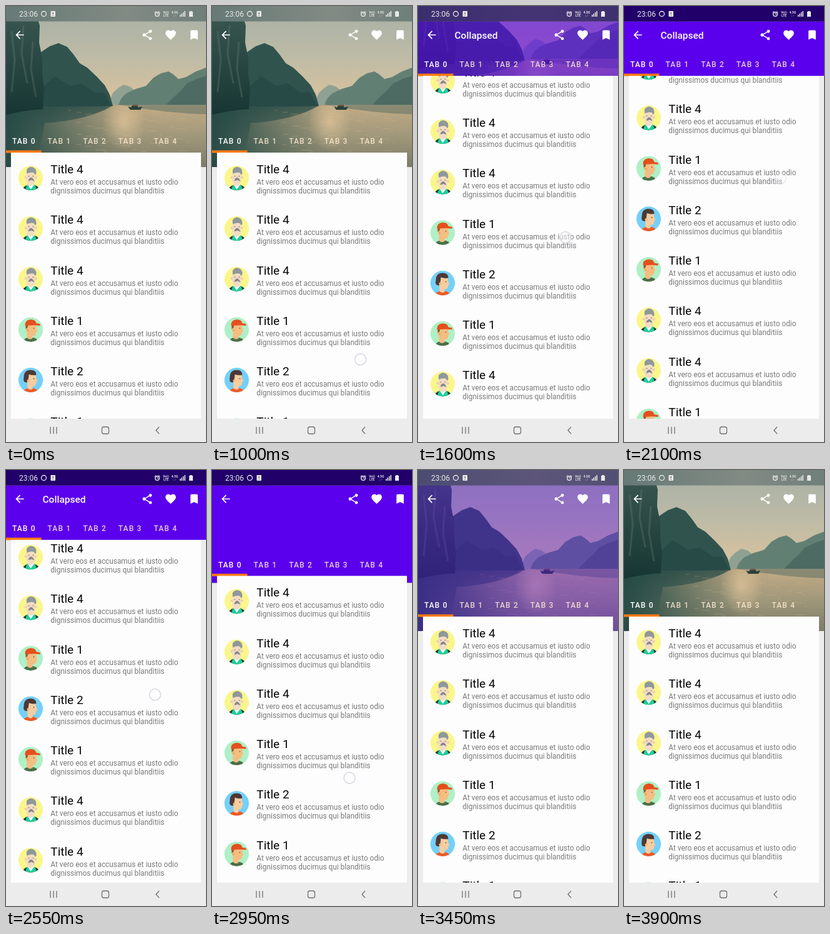
Recreate the animation shown at these times as an HTML page. Size 320 by 693 pixels, loop 3.95 s.

```html
<!DOCTYPE html>
<html lang="en">
<head>
<meta charset="utf-8">
<title>Collapsing header</title>
<style>
html, body { margin: 0; height: 100%; overflow: hidden; background: #ececec; }
svg { display: block; width: 100vw; height: 100vh; font-family: Roboto, sans-serif; }
.title { font-size: 19px; fill: #050505; }
.body { font-size: 11.85px; fill: #7a7a7a; }
.tab { font-size: 12px; font-weight: 500; letter-spacing: 1.15px; fill: #ffecd2; fill-opacity: .85; }
.tab:first-child { fill: #fff; fill-opacity: 1; }
.tiny { font-size: 5px; font-weight: 700; text-anchor: middle; }
</style>
</head>
<body>
<svg viewBox="0 0 320 693" xmlns="http://www.w3.org/2000/svg">
  <defs>
    <linearGradient id="sky" x2="0" y2="1">
      <stop stop-color="#a6b0a6"/><stop offset=".5" stop-color="#bdbba6"/><stop offset="1" stop-color="#dcc39c"/>
    </linearGradient>
    <linearGradient id="water" x2="0" y2="1">
      <stop stop-color="#c2aa84"/><stop offset=".45" stop-color="#a39a7c"/><stop offset="1" stop-color="#7c7c67"/>
    </linearGradient>
    <linearGradient id="shade">
      <stop stop-color="#17413f" stop-opacity=".85"/><stop offset=".2" stop-color="#244a46" stop-opacity=".65"/>
      <stop offset=".5" stop-color="#35544d" stop-opacity=".2"/><stop offset=".65" stop-color="#35544d" stop-opacity="0"/>
    </linearGradient>
    <linearGradient id="reflection" x2="0" y2="1">
      <stop stop-color="#1f4643" stop-opacity=".75"/><stop offset="1" stop-color="#1f4643" stop-opacity="0"/>
    </linearGradient>
    <radialGradient id="glow">
      <stop stop-color="#e2c69a" stop-opacity=".75"/><stop offset="1" stop-color="#e2c69a" stop-opacity="0"/>
    </radialGradient>
    <linearGradient id="rock" x2="0" y2="1">
      <stop stop-color="#3c5952"/><stop offset="1" stop-color="#173633"/>
    </linearGradient>
    <linearGradient id="bar">
      <stop stop-color="#667a76"/><stop offset=".6" stop-color="#828a83"/><stop offset="1" stop-color="#6f7f7a"/>
    </linearGradient>
    <clipPath id="disc"><circle r="19.6"/></clipPath>
    <clipPath id="headClip"><rect id="headBox" width="320"/></clipPath>
    <clipPath id="listClip"><rect id="listBox" x="8" width="304"/></clipPath>

    <g id="face4" clip-path="url(#disc)">
      <circle r="20" fill="#fbf68b"/>
      <path d="M-14 20Q-12 13-5 11H6Q13 13 15 20Z" fill="#203b3a"/>
      <path d="M-9 20L-6 11H7L10 20Z" fill="#1fcf9b"/>
      <path d="M-5 10L0 18 6 10Z" fill="#fff"/>
      <path d="M-7-10H7V4Q6 12 0 13Q-6 12-7 4Z" fill="#f3dcc3"/>
      <circle cx="-8" cy="-1" r="2" fill="#eccdb0"/><circle cx="8.500" cy="-1" r="2" fill="#eccdb0"/>
      <path d="M-6-7Q-9-16 0-18Q10-17 9-7L7-5Q6-9 2-9Q-2-9-6-7Z" fill="#8f989b"/>
      <path d="M-4-3H-2M3-3H5" stroke="#666"/>
      <path d="M-4 4Q-2-1 1-1Q4 0 6 5Q3 4 1 3Q-2 5-4 4Z" fill="#85878d"/>
    </g>
    <g id="face1" clip-path="url(#disc)">
      <circle r="20" fill="#aff0c6"/>
      <path d="M-13 20Q-9 11 0 13Q9 11 12 20Z" fill="#37634a"/>
      <path d="M-12 17L10 14M-13 19.500L11 17" stroke="#a8a94b" stroke-dasharray="1.500 1.500"/>
      <path d="M-8-8H9L9-2 11 2 9 3Q9 10 3 10V14Q-2 17-6 13V3Q-9 0-8-8Z" fill="#f5bd80"/>
      <path d="M-8-8H-4L-5-3-8-1Z" fill="#8a5734"/>
      <circle cx="-5" cy="1" r="2" fill="#eda968"/>
      <path d="M-9-6Q-10-15 0-16Q8-16 9-10L15-9V-6L6-7Z" fill="#e4501d"/>
      <circle cx="5" cy="-2" r=".8" fill="#533"/>
    </g>
    <g id="face2" clip-path="url(#disc)">
      <circle r="20" fill="#74d0f9"/>
      <path d="M-13 20Q-10 12-1 13Q9 11 13 20Z" fill="#ee5a24"/>
      <path d="M-6-9H8L9-2 11 2 9 3Q9 10 3 10V14Q-1 17-5 13Z" fill="#f6cda0"/>
      <path d="M-6 4Q-13 4-11-4Q-11-16 0-16Q9-16 9-8Q2-7-3-9Q-3-1-6 4Z" fill="#4d3935"/>
      <circle cx="-4" cy="1" r="2" fill="#efb680"/><circle cx="5" cy="-2" r=".8" fill="#422"/>
    </g>
  </defs>

  <rect width="320" height="693" fill="#ececec"/>
  <g clip-path="url(#headClip)">
    <g id="photo">
      <rect width="320" height="158" fill="url(#sky)"/>
      <path d="M162 158L171 138 180 130 188 125 198 128 208 136V158Z" fill="#8fa193"/>
      <path d="M180 157Q184 144 194 138L207 132 224 127 236 114 248 107 260 104 268 109 276 116 288 113 304 104 320 98V157Z" fill="#627f74"/>
      <path d="M256 157L268 145 280 134 290 123 305 116 320 111V157Z" fill="#4d6b62"/>
      <rect y="157" width="320" height="100" fill="url(#water)"/>
      <path d="M180 157H320V172Q250 170 180 157Z" fill="#5d7166" opacity=".55"/>
      <rect y="157" width="320" height="100" fill="url(#shade)"/>
      <path d="M0 158H172Q130 182 62 186L52 240H0Z" fill="url(#reflection)"/>
      <ellipse cx="188" cy="184" rx="34" ry="46" fill="url(#glow)" clip-path="inset(20px 0 0 0)"/>
      <path d="M40 162V84L58 72 70 64 84 59 98 65 108 77 118 91 130 98 145 112 158 126 166 141 171 159Z" fill="#30534e"/>
      <path d="M50 160L62 126 78 112 103 127 121 123 142 138 157 137 169 159Z" fill="#234541" opacity=".6"/>
      <path d="M0 173V0H44L54 31 53 58 58 83 58 109 61 130 59 164Q32 165 0 173Z" fill="url(#rock)"/>
      <path d="M9 40L14 86 9 137M28 31L25 76 34 123M43 57L40 100 48 145" fill="none" stroke="#7d8f80" stroke-width="3" opacity=".25"/>
      <path d="M195 160L200 161 203 157H211V161L218 160 215 165H199Z" fill="#2d403b"/>
      <path d="M203 158H211" stroke="#b87046"/>
      <g id="waves" stroke="#e2c69a" stroke-width=".8" opacity=".35"></g>
    </g>
    <rect id="scrim" width="320" height="257" fill="#5b00ec"/>
  </g>

  <g id="tabs"><g id="labels"></g><rect y="229.500" width="56.600" height="4" fill="#ff7a0c"/></g>
  <g clip-path="url(#listClip)">
    <rect x="8" width="304" height="693" fill="#fdfdfd"/>
    <g id="list"></g>
  </g>

  <g fill="#fff">
    <text id="name" x="58.500" y="51.800" font-size="15.500" font-weight="500">Collapsed</text>
    <g id="icons"></g>
  </g>

  <rect width="320" height="24.500" fill="url(#bar)"/>
  <rect id="barScrim" width="320" height="24.500" fill="#210069"/>
  <g fill="#e8e8e8">
    <text x="21" y="17" font-size="12">23:06</text>
    <circle cx="60.500" cy="12.500" r="4" fill="none" stroke="#e8e8e8" stroke-width="1.300"/>
    <rect x="71.500" y="8" width="7.500" height="9" rx="1"/>
    <path d="M75.200 10V13M75.200 14.200V15.400" stroke="#555" stroke-width="1.200"/>
    <circle cx="242" cy="13" r="3.300" fill="none" stroke="#e8e8e8" stroke-width="1.400"/>
    <path d="M242 11V13H244M237.500 10.500L240 8.300M246.500 10.500L244 8.300" fill="none" stroke="#e8e8e8"/>
    <text class="tiny" x="256" y="12">Vo))</text><text class="tiny" x="256" y="17">LTE</text>
    <text class="tiny" x="270" y="12">4.5G</text><text class="tiny" x="270" y="17">↓↑</text>
    <path d="M278 14H279.500V17H278ZM280.500 12H282V17H280.500ZM283 10H284.500V17H283ZM285.500 8H287V17H285.500Z"/>
    <path d="M293 9H294.500V8H297.500V9H299V17H293Z"/>
  </g>

  <rect y="656" width="320" height="37" fill="#ececec"/>
  <g fill="none" stroke="#707070" stroke-width="1.300">
    <path d="M71 669V680M76 669V680M81 669V680M245 669L240 674.500 245 680"/>
    <rect x="153.500" y="669" width="11" height="11" rx="3"/>
  </g>
  <circle id="touch" r="9" fill="#fff" fill-opacity=".45" stroke="#d6d5e3" stroke-width="1.500"/>
</svg>
<script>
const $ = id => document.getElementById(id);
const LOOP = 3950, COLLAPSE = 122, OVERLAP = 23, ROW = 80.25;

$('labels').innerHTML = [0, 1, 2, 3, 4].map(i =>
  `<text class="tab" x="${10 + i * 56.6}" y="219.400">TAB ${i}</text>`).join('');

$('list').innerHTML = [4, 4, 4, 1, 2, 1, 4, 4, 1, 2].map((kind, i) =>
  `<g transform="translate(0 ${i * ROW})">
    <use href="#face${kind}" x="39.500" y="273.500"/>
    <text class="title" x="71.300" y="266">Title ${kind}</text>
    <text class="body" x="71.300" y="284">At vero eos et accusamus et iusto odio</text>
    <text class="body" x="71.300" y="298">dignissimos ducimus qui blanditiis</text>
  </g>`).join('');

$('waves').innerHTML = Array.from({ length: 60 }, (_, i) => {
  const x = 100 + i * 73 % 190, y = 166 + i * 37 % 86;
  return `<path d="M${x} ${y}h${4 + i * 7 % 13}"/>`;
}).join('');

const icons = [
  [22, 'M20 11H7.83l5.59-5.59L12 4l-8 8 8 8 1.41-1.41L7.83 13H20z'],
  [226, 'M18 16.08c-.76 0-1.44.3-1.96.77L8.91 12.7c.05-.23.09-.46.09-.7s-.04-.47-.09-.7l7.05-4.11A3 3 0 1 0 15 5c0 .24.04.47.09.7L8.04 9.81a3 3 0 1 0 0 4.38l7.12 4.16c-.05.21-.08.43-.08.65a2.92 2.92 0 1 0 2.92-2.92z'],
  [263.5, 'M12 21.35l-1.45-1.32C5.4 15.36 2 12.28 2 8.5 2 5.42 4.42 3 7.5 3c1.74 0 3.41.81 4.5 2.09C13.09 3.81 14.76 3 16.5 3 19.58 3 22 5.42 22 8.5c0 3.78-3.4 6.86-8.55 11.54z'],
  [301, 'M17 3H7c-1.1 0-2 .9-2 2v16l7-3 7 3V5c0-1.1-.9-2-2-2z']
];
$('icons').innerHTML = icons.map(([x, d]) =>
  `<path transform="translate(${x} 46) scale(.833) translate(-12 -12)" d="${d}"/>`).join('');

// Keys are [time, value] pairs, joined by straight lines.
const scrollKeys = [[1000, 0], [1100, 0], [1600, 154], [2100, 256], [2220, 272], [2400, 272], [2950, 65], [3150, 0]];
const touchX = [[1000, 237.5], [1600, 236], [2100, 250], [2300, 250], [2950, 220], [3150, 230]];
const touchY = [[1000, 562], [1600, 368], [2100, 274], [2300, 274], [2950, 489], [3150, 572]];
const touchAlpha = [[999, 0], [1000, 1], [2000, 1], [2100, .5], [2300, .5], [2400, 1], [3150, 1], [3250, 0]];
const scrimKeys = [[1230, 0], [1830, 1], [3080, 1], [3680, 0]];

function at(keys, t) {
  const i = keys.findIndex(k => k[0] > t);
  if (i === 0) return keys[0][1];
  if (i < 0) return keys[keys.length - 1][1];
  const [t0, a] = keys[i - 1], [t1, b] = keys[i];
  return a + (b - a) * (t - t0) / (t1 - t0);
}

const set = (id, name, value) => $(id).setAttribute(name, value);
const shift = (id, y) => set(id, 'transform', `translate(0 ${y})`);

function draw(t) {
  const scroll = at(scrollKeys, t), fold = Math.min(scroll, COLLAPSE);
  const top = 233 - fold, lift = fold * (COLLAPSE + OVERLAP) / COLLAPSE;
  set('headBox', 'height', 256 - lift);
  shift('photo', -lift / 2);
  shift('tabs', -fold);
  set('listBox', 'y', top);
  set('listBox', 'height', 656 - top);
  shift('list', -scroll);
  set('name', 'opacity', fold === COLLAPSE ? 1 : 0);
  const scrim = at(scrimKeys, t);
  set('scrim', 'opacity', scrim);
  set('barScrim', 'opacity', scrim);
  set('touch', 'cx', at(touchX, t));
  set('touch', 'cy', at(touchY, t));
  set('touch', 'opacity', at(touchAlpha, t));
}

const start = performance.now();
function frame() {
  draw((performance.now() - start) % LOOP);
  requestAnimationFrame(frame);
}
frame();
</script>
</body>
</html>
```
